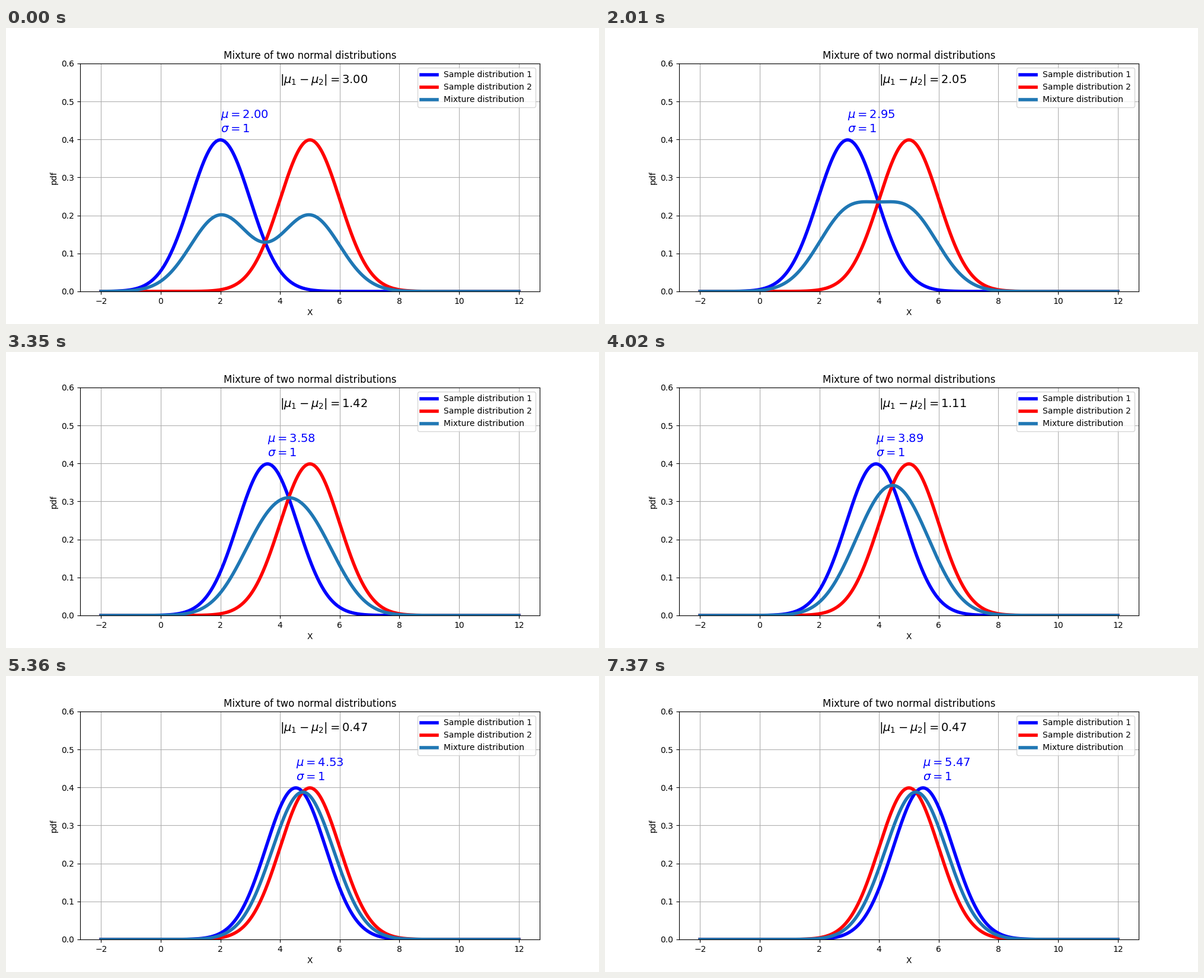
These frames come from a looping animation (1000 px wide and 500 px high, 8000 ms). A matplotlib script:

```python
import numpy as np
import matplotlib.pyplot as plt
from matplotlib.animation import FuncAnimation

LOOP_MS = 8000
TICK_MS = 40
HOLD_MS = 670
MU2 = 5.0
MEANS = np.linspace(2, 8, 20)[:12]

x = np.linspace(-2, 12, 1000)


def normal(mu):
    return np.exp(-(x - mu) ** 2 / 2) / np.sqrt(2 * np.pi)


fig, ax = plt.subplots(figsize=(10, 5), dpi=100)
fixed = normal(MU2)
moving_line, = ax.plot(x, normal(MEANS[0]), color="blue", lw=4,
                       label="Sample distribution 1")
ax.plot(x, fixed, color="red", lw=4, label="Sample distribution 2")
mix_line, = ax.plot(x, fixed, color="tab:blue", lw=4,
                    label="Mixture distribution")

ax.set_xlim(-2.7, 12.7)
ax.set_ylim(0, 0.6)
ax.set_title("Mixture of two normal distributions")
ax.set_xlabel("X")
ax.set_ylabel("pdf")
ax.grid(True)
ax.legend(loc="upper right")

params = ax.text(0, 0.42, "", color="blue", fontsize=14)
gap = ax.text(4, 0.55, "", fontsize=14)


def update(tick):
    # Each mean is held until the next hard step.
    step = min((tick * TICK_MS + TICK_MS - 1) // HOLD_MS, len(MEANS) - 1)
    mu = MEANS[step]
    curve = normal(mu)
    moving_line.set_ydata(curve)
    mix_line.set_ydata((curve + fixed) / 2)
    params.set_x(mu)
    params.set_text(f"$\\mu = {mu:.2f}$\n$\\sigma = 1$")
    gap.set_text(f"$|\\mu_1 - \\mu_2| = {abs(mu - MU2):.2f}$")
    return moving_line, mix_line, params, gap


anim = FuncAnimation(fig, update, frames=LOOP_MS // TICK_MS,
                     interval=TICK_MS, repeat=True, repeat_delay=0)
plt.show()
```
